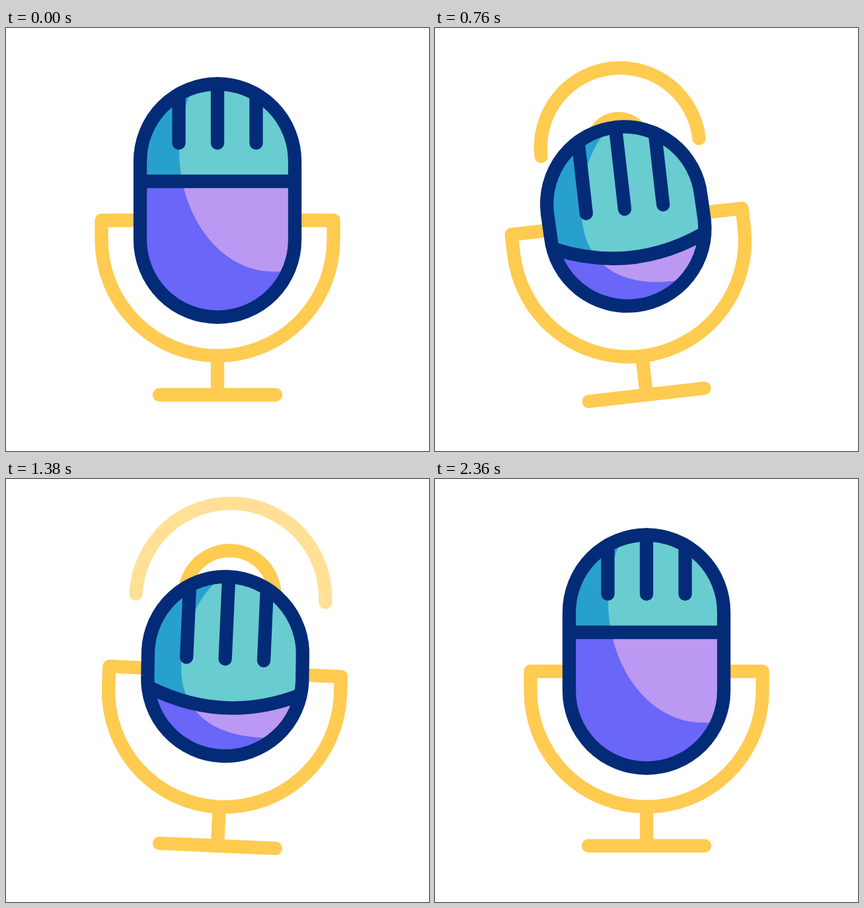
Recreate the animation shown at these times as an HTML page with a canvas. Size 640 by 640 pixels, loop 2400 ms.

```html
<!DOCTYPE html>
<html lang="en">
<head>
<meta charset="utf-8">
<title>Microphone</title>
<style>
html, body { margin: 0; width: 100%; height: 100%; overflow: hidden; background: #fff; }
canvas { display: block; width: 640px; height: 640px; }
</style>
</head>
<body>
<canvas id="stage" width="640" height="640"></canvas>
<script>
const ctx = document.getElementById('stage').getContext('2d');
const LOOP = 2400;
const NAVY = '#032b77', GOLD = '#ffcb50';
const PIVOT = { x: 320, y: 555 };

// Swing in degrees: [time, angle]
const swing = [[0, 0], [604, -25], [918, 12], [1195, -6], [1410, 3], [1690, 0], [LOOP, 0]];

// Body poses: arc centres, divider, bar ends, highlight curve, top shift
const rest = { top: 201.5, bot: 320.5, left: 232, bow: 232, right: 232, bar: 174,
  hx: 404, hw: 142, hy: 185, up: 183, down: 183.5, bulge: 0.552, dx: 0 };
const squash = { top: 264.5, bot: 302, left: 320, bow: 371, right: 322, bar: 272,
  hx: 378, hw: 125, hy: 283, up: 163, down: 105.5, bulge: 0.627, dx: -1 };
const stretch = { top: 174, bot: 341.5, left: 212, bow: 205, right: 212, bar: 146,
  hx: 406, hw: 144, hy: 165, up: 190, down: 222, bulge: 0.552, dx: 0 };
const poses = [[0, rest], [514, squash], [1880, squash], [2170, stretch], [2360, rest], [LOOP, rest]];

// Sound waves: [start, duration]
const waves = [[0, 1072], [366, 1175], [832, 1175], [1156, 1175]];

const clamp = x => Math.min(1, Math.max(0, x));
const ease = x => { x = clamp(x); return x * x * (3 - 2 * x); };
const mix = (a, b, k) => a + (b - a) * k;

function segment(keys, t) {
  let i = 1;
  while (i < keys.length - 1 && t >= keys[i][0]) i++;
  const [t0, a] = keys[i - 1], [t1, b] = keys[i];
  return [a, b, ease((t - t0) / (t1 - t0))];
}

function poseAt(t) {
  const [a, b, k] = segment(poses, t), p = {};
  for (const name in a) p[name] = mix(a[name], b[name], k);
  return p;
}

function stroke(color, build) {
  ctx.strokeStyle = color;
  ctx.beginPath();
  build();
  ctx.stroke();
}

function line(x1, y1, x2, y2) {
  ctx.moveTo(x1, y1);
  ctx.lineTo(x2, y2);
}

function drawWaves(t) {
  for (const [start, dur] of waves) {
    const x = (t - start) / dur;
    if (x <= 0 || x >= 1) continue;
    const r = 151 * ease(x);
    ctx.globalAlpha = ease((0.96 - x) / 0.17);
    stroke(GOLD, () => ctx.arc(320 + 0.0225 * r, 172.5 + 0.05 * r, r, Math.PI, 0));
  }
  ctx.globalAlpha = 1;
}

function drawStand() {
  stroke(GOLD, () => {
    ctx.moveTo(203, 291);
    ctx.lineTo(144.5, 291);
    ctx.lineTo(144.5, 320.5);
    ctx.arc(320, 320.5, 175.5, Math.PI, 0, true);
    ctx.lineTo(495.5, 291);
    ctx.lineTo(437, 291);
    line(320, 496, 320, 555);
    line(232, 555, 408, 555);
  });
}

function capsule(p) {
  ctx.arc(320 + p.dx, p.top, 117, Math.PI, 0);
  ctx.arc(320, p.bot, 117, 0, Math.PI);
  ctx.closePath();
}

function divider(p) {
  ctx.moveTo(206, p.left);
  ctx.quadraticCurveTo(320, p.bow, 434, p.right);
}

function paint(p, dark, light) {
  const bottom = p.hy + p.down;
  ctx.fillStyle = dark;
  ctx.fillRect(190, 0, 260, 500);
  ctx.fillStyle = light;
  ctx.beginPath();
  ctx.moveTo(460, p.hy - p.up);
  ctx.ellipse(p.hx, p.hy, p.hw, p.up, 0, -Math.PI / 2, -Math.PI, true);
  ctx.bezierCurveTo(p.hx - p.hw, p.hy + p.down * p.bulge,
    p.hx - p.hw * p.bulge, bottom, p.hx, bottom);
  ctx.lineTo(460, bottom);
  ctx.fill();
}

function drawBody(p) {
  ctx.save();
  ctx.beginPath();
  capsule(p);
  ctx.clip();
  paint(p, '#6966f8', '#bb99f2');
  ctx.beginPath();
  divider(p);
  ctx.lineTo(460, p.right);
  ctx.lineTo(460, 0);
  ctx.lineTo(180, 0);
  ctx.lineTo(180, p.left);
  ctx.clip();
  paint(p, '#28a0cd', '#69ccd0');
  ctx.restore();

  ctx.lineCap = 'butt';
  stroke(NAVY, () => divider(p));
  ctx.lineCap = 'round';
  stroke(NAVY, () => {
    for (const d of [-58.5, 0, 58.5]) {
      const x = 320 + d + p.dx;
      line(x, p.top - Math.sqrt(117 * 117 - d * d), x, p.bar);
    }
  });
  stroke(NAVY, () => capsule(p));
}

function draw(t) {
  const [a, b, k] = segment(swing, t);
  ctx.fillStyle = '#fff';
  ctx.fillRect(0, 0, 640, 640);
  ctx.save();
  ctx.translate(PIVOT.x, PIVOT.y);
  ctx.rotate(mix(a, b, k) * Math.PI / 180);
  ctx.translate(-PIVOT.x, -PIVOT.y);
  ctx.lineWidth = 20.3;
  ctx.lineCap = ctx.lineJoin = 'round';
  drawWaves(t);
  drawStand();
  drawBody(poseAt(t));
  ctx.restore();
}

const begin = performance.now();
function tick() {
  draw((performance.now() - begin) % LOOP);
  requestAnimationFrame(tick);
}
tick();
</script>
</body>
</html>
```
